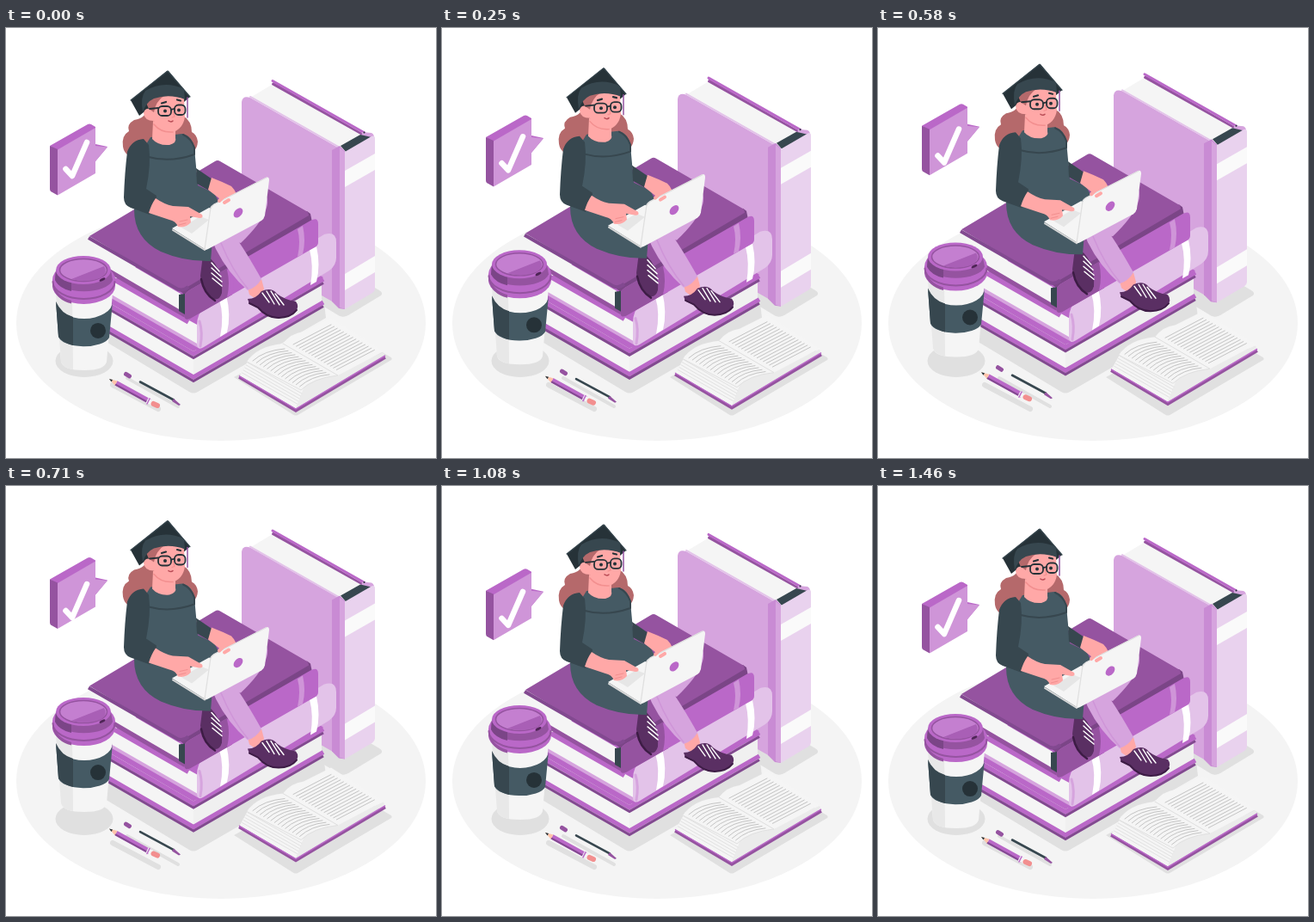
These frames come from a looping animation (500x500 px, 1.5 s). An HTML page:

```html
<!DOCTYPE html>
<html lang="en">
<head>
<meta charset="utf-8">
<title>Studying on a stack of books</title>
<style>
  html, body { margin: 0; height: 100%; overflow: hidden; background: #fff; }
  svg { display: block; width: 100vw; height: 100vh; }
  .line { fill: none; stroke-linecap: round; stroke-linejoin: round; }
  .edge { fill: none; stroke-linejoin: miter; }
  .main { fill: #ba68c8; } .deep { fill: #9553a0; } .dark { fill: #7b4587; }
  .soft { fill: #d6a4de; } .pale { fill: #e3c3e9; } .mid { fill: #cf95d8; }
  .paper { fill: #f5f5f5; } .white { fill: #fff; } .shadow { fill: #e0e0e0; }
  .slate { fill: #455a64; } .coal { fill: #37474f; } .ink { fill: #263238; }
  .skin { fill: #ffa8a7; } .hair { fill: #b5696b; } .shoe { fill: #5a2f63; }
</style>
</head>
<body>
<svg viewBox="0 0 500 500">
  <!-- floor and fixed shadows -->
  <ellipse cx="250" cy="343" rx="238" ry="137" fill="#f4f4f4"/>
  <g class="shadow">
    <path d="M330 300 388 335Q393 337 398 334L436 311Q439 308 434 305L400 285Z"/>
    <path d="M100 355 213 423Q218 426 223 423L372 337 369 312 218 300Z"/>
    <path d="M265 406 333 449Q337 452 341 449L448 386Q450 384 446 382L380 344Z"/>
    <ellipse cx="91" cy="387" rx="33.5" ry="19"/>
  </g>
  <g class="line" stroke="#e0e0e0" stroke-width="6">
    <path d="M124 415 177 443"/>
    <path d="M141 407 200 440" stroke-width="4"/>
  </g>

  <g data-rise="10">
    <!-- standing book -->
    <path class="line" d="M311 65.500 417 126" stroke="#9553a0" stroke-width="4"/>
    <path class="line" d="M310 61.500 417 122" stroke="#ba68c8" stroke-width="3"/>
    <path class="soft" d="M414 121 425 122Q429 124 428 130L412 136Z"/>
    <path class="paper" d="M284 81 309 66 416 126 390 140Z"/>
    <path class="coal" d="M389 137 412 124 425 127 396 145Z"/>
    <circle class="ink" cx="416.500" cy="121.500" r="1"/>
    <path class="soft" d="M274 86Q275 78 284 81L386 139 388 323 274 258Z"/>
    <path class="line" d="M284 80 386 138" stroke="#e3c3e9" stroke-width="2"/>
    <path d="M379 142 388 137 394 143V327L387 326 379 318Z" fill="#c98bd4"/>
    <path class="soft" d="M388 139 394 144V327L388 325Z"/>
    <path fill="#e9d2ee" d="M394 144 425 126Q429 124 429 129V303Q429 306 426 308L394 327Z"/>
    <path fill="#fafafa" d="M394 166 429 146V165L394 185ZM394 286 429 265V284L394 305Z"/>

    <!-- bottom book -->
    <path class="main" d="M100 308 218 376 369 290 250 220Z"/>
    <path class="paper" d="M100 316 218 384V406L100 338Z"/>
    <path fill="#f0f0f0" d="M218 384 367 298V320L218 406Z"/>
    <g class="edge" stroke-width="5">
      <path d="M100 311 218 379 369 292" stroke="#ba68c8"/>
      <path d="M100 315.500 218 383.500 369 296.500" stroke="#824990" stroke-width="3"/>
      <path d="M100 338 218 406 369 319" stroke="#ba68c8"/>
      <path d="M100 342.500 218 410.500 369 323.500" stroke="#824990" stroke-width="3"/>
    </g>

    <!-- middle book -->
    <path class="paper" d="M100 278 224 346V370L100 300Z"/>
    <g class="edge" stroke-width="5">
      <path d="M100 278 212 342" stroke="#ba68c8"/>
      <path d="M100 300 224 371" stroke="#d6a4de"/>
      <path d="M100 303 224 374" stroke="#ba68c8" stroke-width="3"/>
    </g>
    <path class="pale" d="M222 346Q222 331 232 324L370 240Q384 236 384 249V267Q384 276 376 282L230 371Q222 376 222 366Z"/>
    <path class="line" d="M226 370Q229 354 225 341" stroke="#d6a4de" stroke-width="3"/>
    <path class="white" d="M248 316Q254 335 249 359L257 354Q262 334 256 310ZM353 258Q358 276 354 299L361 295Q366 276 361 254Z"/>

    <!-- top book -->
    <path class="paper" d="M102 250 203 309V331L102 271Z"/>
    <path class="edge" d="M100 271 208 334" stroke="#9553a0" stroke-width="5"/>
    <path class="dark" d="M196 301 350 213 354 216 356 226 210 312Z"/>
    <path class="main" d="M207 313Q208 308 213 305L354 224Q363 219 363 228V249Q363 253 359 255L214 338Q207 341 207 333Z"/>
    <path class="deep" d="M207 313Q208 308 213 305L263 276V310L214 338Q207 341 207 333Z"/>
    <path class="mid" d="M339 234Q343 248 339 266L345 263Q349 247 345 230Z"/>
    <path class="main" d="M257 281Q261 297 257 313L263 310Q267 294 263 277Z"/>
    <path class="coal" d="M201 310 208 309V333L201 329Z"/>
    <path class="deep" d="M97 242 243 155Q246 153 249 155L351 214 352 218 206 304 197 302Z"/>
    <path class="edge" d="M96 244 200 304Q206 306 212 301" stroke="#824990" stroke-width="4"/>

    <!-- far leg and both shoes -->
    <path class="soft" d="M270 205 300 192Q307 198 302 212 296 228 273 250L250 245Z"/>
    <path class="shoe" d="M229 264Q240 266 247 281 252 296 251 308 248 319 238 314 227 304 226 288Z"/>
    <path class="line" d="M227 292Q230 309 243 317" stroke="#3d1c45" stroke-width="2.500"/>
    <path class="line" d="M239 273 248 283M239 279 250 289M239 285 251 295M240 291 251 300" stroke="#fff" stroke-width="1.500"/>
    <path class="skin" d="M281 302 297 292 300 303Q298 313 289 314L283 310Z"/>
    <path class="shoe" d="M281 315Q291 315 297 306 309 301 315 309 324 316 337 318 342 324 336 331 324 339 310 337 299 332 293 325L283 321Z"/>
    <path class="line" d="M283 320 293 325Q303 337 317 337 331 337 338 328" stroke="#3d1c45" stroke-width="2"/>
    <path class="line" d="M298 308 306 319M303 306 312 321M308 306 318 322M313 309 323 322" stroke="#fff" stroke-width="1.400"/>
    <path class="soft" d="M238 243 264 239Q278 258 297 292 291 302 281 305 258 285 244 257Z"/>
    <path class="line" d="M250 250Q263 282 281 303" stroke="#cf95d8" stroke-width="1.500"/>

    <!-- hair, gown -->
    <path class="hair" d="M165 92Q163 105 149 107 140 112 143 120 134 125 136 138 138 150 152 151L205 148Q222 147 223 132 222 124 216 121 216 108 206 102Z"/>
    <path class="slate" d="M168 127 205 123Q216 125 219 139L223 183 242 192 262 230 240 246 238 271Q208 272 180 260 149 245 149 211L163 190 160 140Z"/>
    <path class="line" d="M164 141Q162 147 166 150 191 157 219 147V139Q215 128 206 124" stroke="#37474f" stroke-width="2"/>
    <path class="coal" d="M160 129Q146 130 141 144 138 168 137 197 137 206 145 209L167 217Q175 208 175 195L163 187Q169 158 166 136Z"/>
    <path class="coal" d="M221 163 240 176 236 189 222 181Z"/>

    <!-- cap board, then head -->
    <path class="ink" d="M145 84 187 50 189 50 214 80 207 86 160 98 155 102Z"/>
    <path class="line" d="M211 81V104" stroke="#9553a0" stroke-width="1.500"/>
    <path class="skin" d="M171 108 197 116V128Q199 133 190 136 177 137 170 129Z"/>
    <path class="skin" d="M167 86Q188 71 207 82L208 103Q206 118 192 122 178 122 172 108 161 108 160 99 161 93 168 94Z"/>
    <path class="line" d="M172 112Q180 122 194 121" stroke="#f28f8f" stroke-width="1.500"/>
    <path class="hair" d="M162 85Q172 76 185 78 174 85 172 98L166 94Z"/>
    <g class="line" stroke="#263238" stroke-width="1.800">
      <path d="M167 94 177 93M192 95 196 94"/>
      <rect x="177" y="91" width="15" height="11" rx="4.500"/>
      <rect x="196" y="89.500" width="12.500" height="11.500" rx="4.500"/>
      <path d="M181 87.500 186 86M199 83.500 203 84.500" stroke-width="2.200"/>
    </g>
    <circle class="ink" cx="185" cy="96.500" r="2"/>
    <circle class="ink" cx="201" cy="95.500" r="2"/>
    <path class="line" d="M194 97 196 103 193 104" stroke="#f28f8f" stroke-width="1.200"/>
    <path class="line" d="M189 108Q192 110 194 108" stroke="#b94b55" stroke-width="1.500"/>

    <!-- cap crown -->
    <path class="coal" d="M159 98Q156 80 162 73 184 60 207 71L208 83Q190 76 172 82 163 86 159 98Z"/>
    <path class="line" d="M145 84 188 50 214 80" stroke="#37474f" stroke-width="1.200"/>

    <!-- laptop and hands -->
    <path class="skin" d="M239 174Q252 179 262 184 269 191 268 199L260 203 249 199 235 188Z"/>
    <path class="paper" d="M193 233 236 209 250 213 231 257Z"/>
    <path class="line" d="M194 235 231 258" stroke="#d8d8d8" stroke-width="2"/>
    <path fill="#e6e6e6" d="M204 232 226 219 236 223 216 239Z"/>
    <path class="paper" d="M231 257 238 210Q239 207 242 205L302 174Q306 172 306 177L301 218Q300 222 297 224L235 257Q231 259 231 257Z"/>
    <path class="line" d="M231 257 238 209Q239 207 242 205L303 174" stroke="#e0e0e0" stroke-width="1.300"/>
    <ellipse class="main" cx="270" cy="215" rx="6.500" ry="4.300" transform="rotate(-48 270 215)"/>
    <path class="skin" d="M174 198Q184 205 194 207L212 208 228 217Q230 221 225 221L214 219 215 226Q209 233 200 231 197 224 190 223L166 215Q169 205 174 198Z"/>
    <path class="line" d="M202 225 211 223M201 229 209 227" stroke="#f28f8f" stroke-width="1"/>
    <path class="line" d="M252 197 248 201M259 200 254 203" stroke="#ffa8a7" stroke-width="4"/>

    <!-- open book -->
    <path class="edge" d="M271 406 337 445 441 383" stroke="#9553a0" stroke-width="3.500"/>
    <path class="edge" d="M271 404.500 337 443 441 381" stroke="#ba68c8" stroke-width="1.500"/>
    <path fill="#ebebeb" d="M272 404 283 384 386 400 439 377 440 380 337 442Z"/>
    <path class="paper" d="M272 404 283 384 346 419 337 442Z"/>
    <g id="fan" class="line" stroke="#dcdcdc" stroke-width=".8"></g>
    <path class="paper" d="M322 367Q331 355 346 353L378 337 439 376 386 404Z"/>
    <path class="paper" d="M280 388Q292 370 322 367L386 404Q357 407 343 421Z"/>
    <path class="line" d="M280 388 343 421Q357 407 386 404L322 367" stroke="#e0e0e0" stroke-width="1"/>
    <g id="text" class="line" stroke="#c4c4c4" stroke-width="1"></g>

    <!-- pencil and pen -->
    <g transform="translate(0 1)">
      <path class="line" d="M128 412 168 434" stroke="#ba68c8" stroke-width="6" style="stroke-linecap:butt"/>
      <path class="line" d="M127 413.500 167 435.500" stroke="#824990" stroke-width="2"/>
      <path fill="#ffc3a9" d="M120 407 129.500 409.500 126.500 414.500Z"/>
      <path class="ink" d="M120 407 124 408 122.500 410.500Z"/>
      <path class="line" d="M164 432 170 435" stroke="#f5f5f5" stroke-width="6" style="stroke-linecap:butt"/>
      <path class="line" d="M167 430 164 436" stroke="#ba68c8" stroke-width="1.500"/>
      <path class="line" d="M171.500 436 176 438" stroke="#f28f8f" stroke-width="6"/>
      <path class="line" d="M139.500 401.500 143.500 404" stroke="#9553a0" stroke-width="5"/>
      <path class="line" d="M147 406 154 410" stroke="#f5f5f5" stroke-width="3"/>
      <path class="line" d="M156 410.500 195 431.500" stroke="#37474f" stroke-width="2.600"/>
      <path class="deep" d="M195 430 203 437 201 438 193 433Z"/>
    </g>
  </g>

  <!-- coffee cup -->
  <g data-rise="20">
    <path class="paper" d="M58 308 64 388Q66 398 91 398 115 398 117 388L124 308Z"/>
    <path fill="#e8e8e8" d="M58 308 64 388Q66 395 78 397L77 308Z"/>
    <path class="slate" d="M58 318A33 20 0 0 0 124 318L120 360A30 13 0 0 1 61 359Z"/>
    <path class="coal" d="M58 318Q64 332 78 336V369Q66 366 61 359Z"/>
    <circle class="ink" cx="107" cy="352" r="9"/>
    <path class="main" d="M54 293A36.500 22 0 0 1 127 293V300A36.500 21 0 0 1 54 300Z"/>
    <path class="deep" d="M54 294Q58 312 76 317V320.500Q58 316 54 300Z"/>
    <path class="line" d="M54.500 295A36 20 0 0 0 126.500 295" stroke="#9553a0" stroke-width="2"/>
    <path class="deep" d="M58 282 57 293A34 16 0 0 0 124 293L122 282Z"/>
    <path class="dark" d="M58 282 57 293Q62 303 76 306V291Z"/>
    <ellipse class="main" cx="90" cy="281.500" rx="32" ry="16.500"/>
    <ellipse cx="90" cy="281.500" rx="27.500" ry="13" fill="#c47fd0" stroke="#9553a0" stroke-width="1.500"/>
    <path fill="#a95fb6" d="M76 292 114 277Q119 284 111 290 95 297 76 292Z"/>
    <ellipse cx="112" cy="292.500" rx="3.800" ry="1.500" fill="#4f2557" transform="rotate(-28 112 292.500)"/>
  </g>

  <!-- check bubble; the mark drifts less than its panel -->
  <g data-rise="30">
    <path class="main" d="M51 137 95 112Q97 111 99 112L104 115V135L118 138 104 155 60 143Z"/>
    <path class="deep" d="M51 137 60 141V194.500L52 190Q51 189 51 187Z"/>
    <path class="mid" d="M60 141.500 104 116V137L118 138.500 104 155V169L60 194.500Z"/>
  </g>
  <path data-rise="20" class="line" d="M69.500 164 77 172 94 133" stroke="#fff" stroke-width="6.500"/>
</svg>
<script>
  const PERIOD = 1500, LEAD = 20;
  const byId = id => document.getElementById(id);
  const repeat = (count, draw) =>
    Array.from({ length: count }, (_, i) => `<path d="${draw(i)}"/>`).join('');

  // Text rows run across the pages and step along the spine.
  byId('text').innerHTML =
    repeat(15, i => `M${334 + i * 3.6} ${368 + i * 2.1}l44 -23`) +
    repeat(14, i => `M${287 + i * 4.2} ${387 + i * 2.3}q13 -12 ${37 - i * 0.2} -14`);
  byId('fan').innerHTML =
    repeat(5, i => `M${281 - i * 1.6} ${389 + i * 3}l${63 + i * 0.2} 36`);

  const floaters = [...document.querySelectorAll('[data-rise]')];
  const level = ms => 1 - Math.abs(1 - 2 * (ms / PERIOD % 1));

  function render(now) {
    const lift = level(now + LEAD) - level(LEAD);
    for (const part of floaters)
      part.setAttribute('transform', `translate(0 ${-part.dataset.rise * lift})`);
    requestAnimationFrame(render);
  }
  render(0);
</script>
</body>
</html>
```
